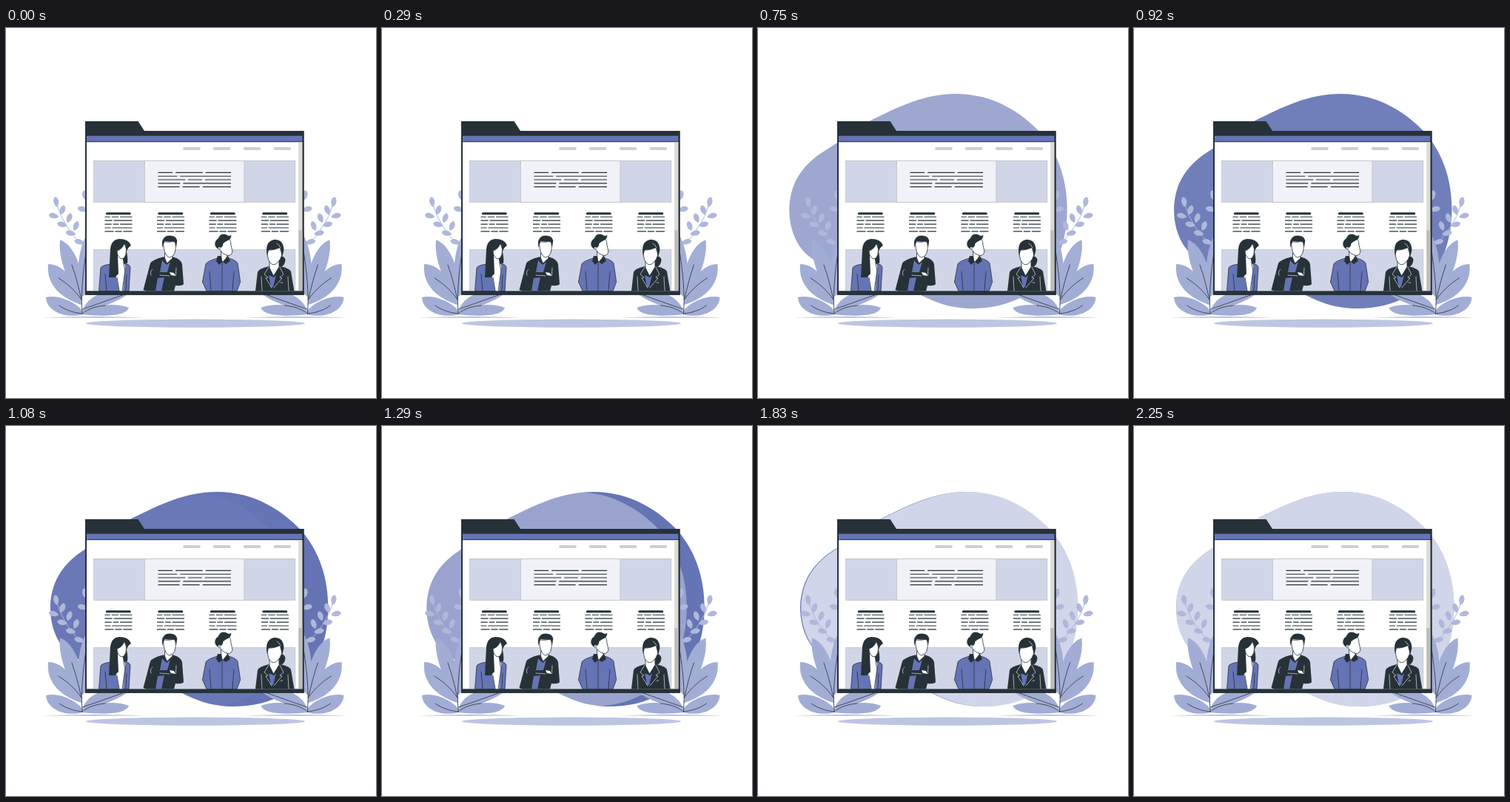
An HTML page that plays this animation: 500 by 500 pixels, repeating every 2.29 s.

```html
<!DOCTYPE html>
<html lang="en">
<head>
<meta charset="utf-8">
<title>Team page</title>
<style>
  html, body { margin: 0; width: 100%; height: 100%; overflow: hidden; background: #fff; }
  svg { display: block; width: 100%; height: 100%; }
  .dark { fill: #263238; }
  .blue { fill: #6574b5; }
  .pale { fill: #d0d5e8; }
  .white { fill: #fff; }
  .skin { fill: #fff; stroke: #263238; stroke-width: .8; }
  .line { fill: none; stroke: #263238; stroke-width: .8; stroke-linecap: round; stroke-linejoin: round; }
  .seam { fill: none; stroke: #fff; stroke-width: .6; stroke-linecap: round; }
  .edged { stroke: #263238; stroke-width: .8; }
  .rule { fill: none; stroke: #263238; stroke-width: 1.15; }
</style>
</head>
<body>
<svg viewBox="0 0 500 500">
  <defs>
    <path id="blob" d="M57 245C58 200 85 178 108 164C128 152 146 136 165 126C205 106 240 89 282 89C335 89 372 116 396 141C421 170 432.5 206 432.5 245C432.5 300 410 340 376 361C353 374 328 379 305 379C275 379 255 371 235 361C200 335 150 328 110 320C74 314 57 280 57 245Z"/>
    <g id="sprig" fill="#afb8da">
      <path d="M69 239Q77 268 103 293" fill="none" stroke="#afb8da"/>
      <g id="leaflets"></g>
    </g>
    <g id="plant">
      <use href="#sprig"/>
      <use href="#sprig" x="39" y="-9"/>
      <path d="M48 391.5Q119 388.5 190 391.5Z" fill="#a2add5"/>
      <g fill="#a2add5">
        <path d="M102 370C84 345 70 312 73 286.5C85 290 98 308 102 335Z"/>
        <path d="M101 365C94 330 98 300 108 281L124 276V345Z"/>
        <path d="M102 374C76 366 54 348 57 319C77 319 97 342 103 374Z"/>
        <path d="M104 387C82 393 55 384 54 364C66 360 92 367 104 383Z"/>
        <path d="M103 384C108 362 138 350 168 357C150 372 125 378 103 385Z"/>
        <path d="M103 387C118 373 148 371 166 378C162 390 130 390 103 387Z"/>
      </g>
      <path class="line" d="M103 386C101 358 104 330 108 304M102 367C98 350 94 334 89 320M102 367C92 353 82 345 71 338M103 386C92 385 80 381 72 375M103 380C124 373 143 366 160 360M103 386C112 379 122 376 134 375"/>
    </g>
  </defs>

  <rect class="white" width="500" height="500"/>
  <use id="base" href="#blob" class="blue"/>
  <use id="veil" href="#blob" class="white"/>
  <ellipse cx="256" cy="399.2" rx="148" ry="5.6" fill="#bdc5e2"/>
  <use href="#plant"/>
  <use href="#plant" transform="matrix(-1 0 0 1 510.5 0)"/>

  <!-- window -->
  <path class="dark" d="M107 126H178.5L187 139H402.8V360.8H107Z"/>
  <rect class="blue" x="109" y="145.7" width="291.3" height="7.5"/>
  <rect class="white" x="109" y="154.2" width="291.3" height="201.3"/>
  <rect x="395.3" y="154.2" width="5" height="201.3" fill="#dadad7"/>
  <rect x="395.3" y="273" width="5" height="82.5" fill="#bdbdbd"/>
  <path d="M241 163H385" stroke="#cfcfd0" stroke-width="3.8" stroke-linecap="round" stroke-dasharray="20 20.8"/>
  <g stroke="#bfc1c9" stroke-width=".8">
    <rect class="pale" x="118.5" y="179.5" width="272.3" height="55.8"/>
    <rect x="187.5" y="179.5" width="134.5" height="55.8" fill="#f1f2f8"/>
    <path class="pale" d="M118.5 355.5V299.5H390.8V355.5"/>
  </g>
  <path id="intro" class="rule"/>
  <g id="columns"></g>

  <!-- woman with long hair -->
  <path class="blue edged" d="M125.5 355.5L128 324Q129 321 141 319L163 319Q167 320 168 323L166 355.5Z"/>
  <path class="white" d="M150 308L159 312L161 322L158 355.5H153L149 335Z"/>
  <path class="dark" d="M139 337L141 299Q142 286 153 285Q166 285 169 294Q165 296 163 302Q165 313 164 318L159 319L157 308L151 308L152 332L147 337Z"/>
  <path class="skin" d="M150 301Q157 299 160 291Q164 299 162 306Q159 314 154 311Q150 308 150 301Z"/>
  <path class="line" d="M134 332L136 355M163 334L162 355M159 319L161 328L157 355M150 337L153 355"/>

  <!-- man with crossed arms -->
  <path class="dark" d="M185.5 354L195 318Q198 313 212 309.5H226Q236 312 238 319L240 346Q238 349 229 348L227 355.5H190Z"/>
  <path class="blue" d="M211 314L217 320L222 316L218 330H208ZM205 338L214 337L210 355.5H202Z"/>
  <path class="skin" d="M214.5 304V311L217.5 318L225 311V304Z"/>
  <path class="skin" d="M212.5 289Q221 290 229 288Q231 310 220.5 310Q213 307 212.5 289Z"/>
  <path class="dark" d="M211.5 297Q209 284 217 281Q229 279 231.3 287L230 297Q229.5 291 227 288.5Q220 289 214.5 288Q213 291 211.5 297Z"/>
  <path class="seam" d="M196 334Q194 329 198 326M208 334L221 335M230 324L229.5 334"/>
  <path class="white" d="M221 330L227 331L229 335L223 334Z"/>

  <!-- man with a quiff -->
  <path class="blue edged" d="M271 355.5L265.5 343L270 319Q272 315 286 311H301Q311 314 313 318L316.7 343L312 355.5Z"/>
  <path class="line" d="M275 329L277 355M308 329L306 355M292 318V355"/>
  <path class="dark" d="M286 308L300 308L303 315L297 319L292.5 316L288 320L284 315Z"/>
  <path class="skin" d="M290.5 302L291 310L292.5 317L299 309V305Z"/>
  <path class="skin" d="M289 292Q296 291 301.5 284Q304 288 304 293L306 302Q305 307 301 307.5Q292 306 289 299Z"/>
  <path class="dark" d="M289 300Q281 296 282.5 290Q284 286 287 284Q290 277 297 279L301 281L304.5 280Q304 286 298 288Q293 289 293 294L291 297Q287 294 287 298Z"/>

  <!-- woman with a ponytail -->
  <path class="dark" d="M368 309Q377 307 377.5 314Q377 321 371 323L365 320Z"/>
  <path class="dark" d="M337 355.5L340 330Q342 325 355 322H371Q383 325 385 329L389.5 355.5Z"/>
  <path class="blue" d="M355 334L362 337L365 334L361 350H358Z"/>
  <path class="skin" d="M356 315V324L361.5 335L369 323V314Z"/>
  <path class="skin" d="M353.5 300Q363 301 373 295Q375 309 367 317Q361 323 356 316Q353 311 353.5 300Z"/>
  <path class="dark" d="M353 308Q349 289 362 286Q375 285 375.5 300L373 310Q372 304 370 297Q362 300 355 300Z"/>
  <path class="seam" d="M355 323L349 333L354 337L351 338L359 351M370 323L375 333L370 337L373 338L362 351M345 336L346 355M381 336L382 355M371 344H374M366 291Q370 293 371 297"/>
  <rect class="dark" x="107" y="355.5" width="295.8" height="5.3"/>
</svg>

<script>
const LOOP = 2290, TRAVEL = 40;
const el = id => document.getElementById(id);

function seeded(seed) {
  return () => (seed = seed * 16807 % 2147483647) / 2147483647;
}

// Five lines of placeholder text, each broken by one or two gaps.
function textBlock(x, y, width, leading, gap, seed) {
  const random = seeded(seed);
  let d = '';
  for (let row = 0; row < 5; row++) {
    const first = width * (.2 + .2 * random());
    const second = width * (.5 + .25 * random());
    d += `M${x} ${y + row * leading}h${first}m${gap} 0`;
    d += row % 2 ? `H${x + width}` : `H${x + second}m${gap} 0H${x + width}`;
  }
  return d;
}

el('intro').setAttribute('d', textBlock(205.5, 195.4, 98.5, 4.8, 4, 11));
for (let i = 0; i < 4; i++) {
  const x = 133.5 + 70.5 * i;
  el('columns').innerHTML += `
    <path class="rule" d="${textBlock(x, 255.2, 37, 4.93, 1.8, 23)}"/>
    <rect class="dark" x="${x + 1.3}" y="249.2" width="34" height="3" rx="1.5"/>`;
}

const leaflet = (x, y, turn) =>
  `<path transform="translate(${x} ${y}) rotate(${turn})" d="M0 7C-5 3 -5 -4 -1 -6.7C4 -6 5 2 0 7Z"/>`;
let leaflets = leaflet(68, 235, -8);
for (let i = 0; i < 4; i++) {
  leaflets += leaflet(64.5 + 11.5 * i, 253.5 + 11.7 * i, -75);
  if (i < 3) leaflets += leaflet(76.5 + 9.2 * i, 246 + 10.8 * i, 22);
}
el('leaflets').innerHTML = leaflets;

// Distance still to go, from 1 to 0, swinging once past the end.
function swing(t, start, duration, damping) {
  const u = Math.min(1, Math.max(0, (t - start) / duration));
  return Math.cos(Math.PI * u) * (1 - u) ** damping;
}

function slide(id, remaining, fullOpacity) {
  el(id).setAttribute('transform', `translate(${-TRAVEL * remaining} 0)`);
  el(id).setAttribute('opacity', fullOpacity * Math.min(1, 1 - remaining));
}

function draw(t) {
  slide('base', swing(t, 430, 1110, 1.5), 1);
  slide('veil', swing(t, 1058, 1300, 2.5), .7);
}

const start = performance.now();
function tick() {
  draw((performance.now() - start) % LOOP);
  requestAnimationFrame(tick);
}
tick();
</script>
</body>
</html>
```
